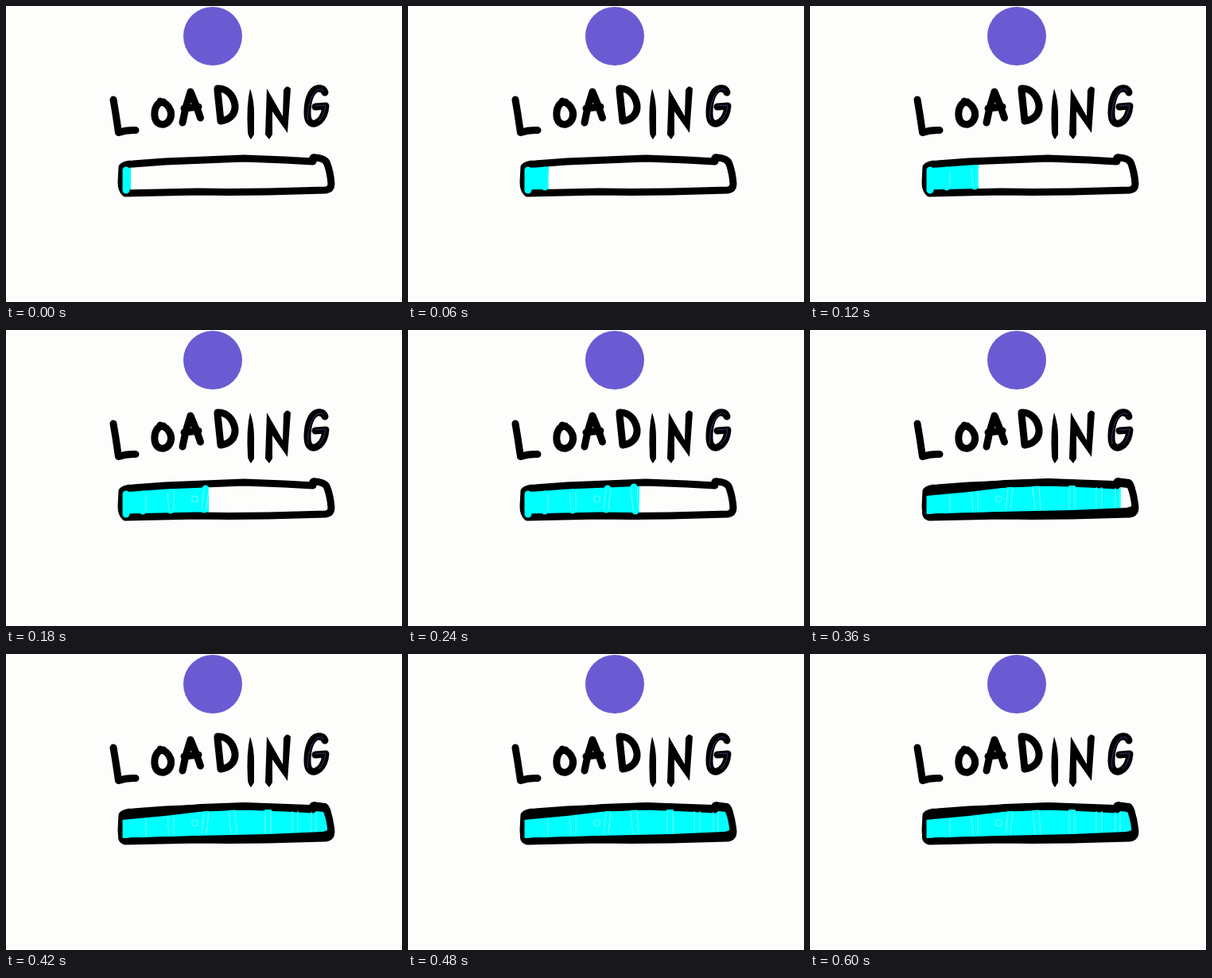
Write an HTML page that moves like this. It is 498 px wide and 373 px high and loops after 660 ms.

```html
<!DOCTYPE html>
<html lang="en">
<head>
<meta charset="utf-8">
<title>Loading</title>
<style>
  html, body { margin: 0; width: 100%; height: 100%; overflow: hidden; background: #fdfefc; }
  svg { display: block; width: 498px; height: 373px; }
  .ink { fill: none; stroke: #000; stroke-width: 9; stroke-linecap: round; stroke-linejoin: round; }
  .seams { fill: none; stroke: #78fcfc; stroke-width: 1; }
  .caps { fill: none; stroke: #0ff; stroke-width: 9; stroke-linecap: round; }
  #level { animation: fill 660ms step-end infinite; }
  .heavy { animation: thicken 660ms step-end infinite; }
  /* eleven equal steps of 60 ms */
  @keyframes fill {
    0% { width: 17px; }
    9.09% { width: 37px; }
    18.18% { width: 72px; }
    27.27% { width: 115px; }
    36.36% { width: 151px; }
    45.45% { width: 194px; }
    54.54% { width: 251px; }
    63.63%, 100% { width: 268px; }
  }
  @keyframes thicken {
    0% { visibility: hidden; }
    54.54%, 100% { visibility: visible; }
  }
</style>
</head>
<body>
<svg viewBox="0 0 498 373">
  <defs>
    <clipPath id="progress"><rect id="level" x="140" y="180" width="17" height="70"/></clipPath>
  </defs>

  <circle cx="260" cy="38" r="37" fill="#6b5bd3"/>

  <!-- lettering -->
  <g class="ink">
    <path d="M135 118L138 136L141.500 159.500Q151 156 163 156.500"/>
    <path d="M198 121C190 120 186 130 187 139C188 147 193 150 199 149C206 147 209 139 207 132C205 126 201 122 194 120"/>
    <path d="M222 147L226 128L232 108L239 125L244.500 141M224 129L242 127"/>
    <path d="M266 106L270 145C280 144 289 137 288 125C286 112 277 103 266 104"/>
    <path d="M389 127L402 126Q401 139 394 145C385 152 379 147 379 135C379 120 383 106 392 104Q399 103 401 109"/>
  </g>
  <path d="M307 104Q312 118 312 135L312 162L308 168Q304 163 304 158Q302 125 307 104Z"/>
  <path d="M328 104L348 139L349 106Q353 98 358 104L354 160L335 133L335 162L331 168L326 162Z"/>
  <path d="M389 126L402 125Q400 139 393 145M400 107Q396 103 391 106C383 113 378 130 380 144" fill="none" stroke="#39356f" stroke-width="1"/>

  <!-- bar -->
  <path clip-path="url(#progress)" d="M146 203L200 198L250 195L300 193L406 197V228L330 232L240 233L146 235Z" fill="#0ff"/>
  <path class="ink" stroke-width="8" d="M146 203Q149 199 160 199L200 196L250 194L299 192L350 194L386 196Q384 190 389 191Q402 192 404 199Q408 210 409 224Q409 231 402 232L330 234L280 234.500L240 234L150 236Q145 232 145 222Z"/>
  <g class="caps" clip-path="url(#progress)">
    <path d="M151 207V232M172 207V228M207 205V227M251 200L249 226M284 198L286 228M329.500 197V228"/>
  </g>
  <path class="heavy" fill-rule="evenodd" d="M142 203Q145 198 152 197L245 189L300 187L382 190Q386 185 391 187L402 188Q407 190 409 200L413 224Q412 233 404 235L330 237L240 237L150 240Q142 239 141 232ZM146 209L200 204L250 198L300 196L345 196L390 198L400 199L404 212L405 222L398 224L330 227L240 229L146 232Z"/>
  <g class="seams" clip-path="url(#progress)">
    <path d="M176 208V229M203 204L205 228M211 203V228M249 200L246 226M255 199L252 227M280 198L283 227M288 197L290 227M326 198V226M333 198V226M360 198V225M367 198V225M384 199V224M390 199V224"/>
    <circle cx="237.500" cy="213" r="4"/>
  </g>
</svg>
</body>
</html>
```
